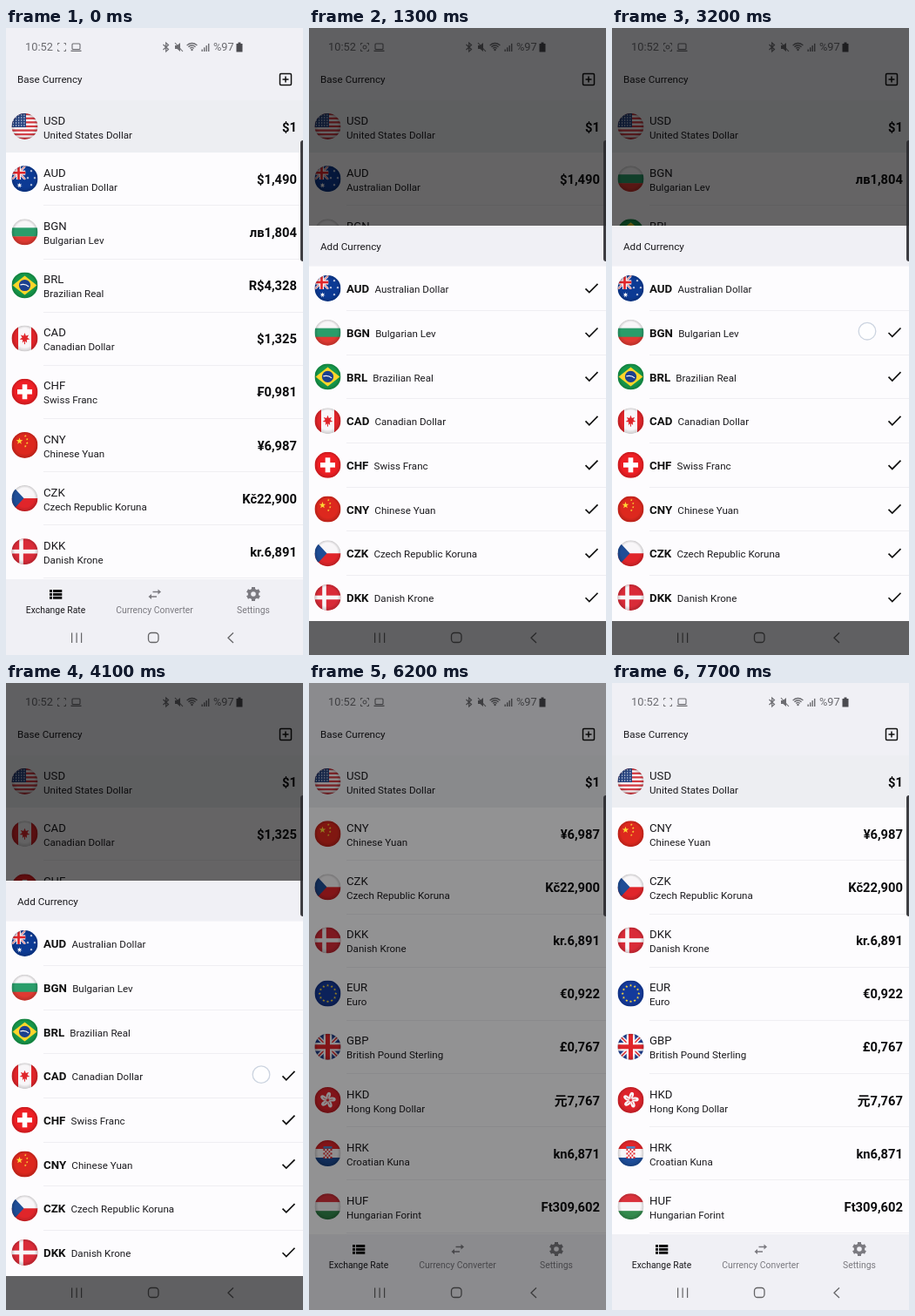
Write an HTML page with a canvas that moves like this. It is 341 px wide and 720 px high and loops after 8000 ms.

```html
<!DOCTYPE html>
<html lang="en">
<head>
<meta charset="utf-8">
<title>Exchange rates</title>
<style>
html, body { margin: 0; width: 100%; height: 100%; overflow: hidden; background: #f0f0f5; }
canvas { display: block; width: 341px; height: 720px; }
</style>
</head>
<body>
<canvas id="stage"></canvas>
<script>
const W = 341, H = 720, LOOP = 8000, STEP = 100;
const FONT = 'Roboto, "Noto Sans", "Noto Sans CJK SC", sans-serif';
const PANEL = '#f0f0f5', PAPER = '#fdfcfe', LINE = '#efeef2', INK = '#1c1b1f', GREY = '#7b7a80';
const STATUS = '#6c6c71', WHITE = '#f8f6f8', RED = '#e0252a';
const ROW = 61.14, SHEET_ROW = 50.71, SHEET_TOP = 227, NAV_TOP = 681;
const OPEN = 900, OPEN_MS = 400, DRAG = 5600, CLOSE = 6000, CLOSE_MS = 400, DIM = 0.6;
const TAU = 2 * Math.PI;

const dpr = window.devicePixelRatio || 1;
function setup(canvas) {
  canvas.width = W * dpr;
  canvas.height = H * dpr;
  const ctx = canvas.getContext('2d');
  ctx.scale(dpr, dpr);
  return ctx;
}
const screen = setup(document.getElementById('stage'));
const sheetCanvas = document.createElement('canvas');
const sheetCtx = setup(sheetCanvas);
let g = screen;

// ---------- drawing helpers ----------
const range = n => [...Array(n).keys()];
const polar = (x, y, r, a) => [x + r * Math.cos(a), y + r * Math.sin(a)];

function rect(color, x, y, w, h) {
  g.fillStyle = color;
  g.fillRect(x, y, w, h);
}
function disc(color, x, y, r) {
  g.fillStyle = color;
  g.beginPath();
  g.arc(x, y, r, 0, TAU);
  g.fill();
}
function arc(color, width, x, y, r, from = 0, to = TAU) {
  g.strokeStyle = color;
  g.lineWidth = width;
  g.beginPath();
  g.arc(x, y, r, from, to);
  g.stroke();
}
function trace(points) {
  g.beginPath();
  points.forEach(([x, y]) => g.lineTo(x, y));
}
function poly(color, points) {
  g.fillStyle = color;
  trace(points);
  g.fill();
}
function stroke(color, width, points) {
  g.strokeStyle = color;
  g.lineWidth = width;
  trace(points);
  g.stroke();
}
function box(color, width, x, y, w, h, r) {
  g.strokeStyle = color;
  g.lineWidth = width;
  g.beginPath();
  g.roundRect(x, y, w, h, r);
  g.stroke();
}
function text(str, x, y, size, color = INK, weight = 400, align = 'left') {
  g.font = `${weight} ${size}px ${FONT}`;
  g.textAlign = align;
  g.fillStyle = color;
  g.fillText(str, x, y);
  return g.measureText(str).width;
}
function star(color, x, y, r, n = 5, inner = 0.4) {
  poly(color, range(2 * n).map(i => polar(x, y, i % 2 ? r * inner : r, Math.PI * (i / n - 0.5))));
}

// ---------- flags, drawn around (0, 0) inside a 30 px circle ----------
const field = color => rect(color, -15, -15, 30, 30);

function bands(...colors) {
  const h = 30 / colors.length;
  colors.forEach((c, i) => rect(c, -15, -15 + i * h, 30, h + 0.3));
}
function cross(color, w, len = 30, x = 0) {
  rect(color, x - w / 2, -len / 2, w, len);
  rect(color, -len / 2, -w / 2, len, w);
}
function unionJack() {
  field('#1d3f94');
  for (const s of [1, -1]) {
    stroke(WHITE, 4.5, [[-15, -15 * s], [15, 15 * s]]);
    stroke(RED, 1.5, [[-15, -15 * s], [15, 15 * s]]);
  }
  cross(WHITE, 9.5);
  cross(RED, 5);
}

const flags = {
  USD() {
    bands(...range(13).map(i => i % 2 ? WHITE : '#d23a42'));
    rect('#27437f', -15, -15, 16.5, 16);
    range(25).forEach(i => disc('#e4e8f2', -13 + i % 5 * 3.1, -13 + Math.floor(i / 5) * 3, 0.7));
  },
  AUD() {
    field('#0c3a94');
    g.save();
    g.beginPath();
    g.rect(-15, -15, 16, 16);
    g.clip();
    g.translate(-7, -7);
    g.scale(0.53, 0.53);
    unionJack();
    g.restore();
    star(WHITE, -6, 7.5, 3.2, 7);
    range(4).forEach(i => star(WHITE, ...polar(7.5, -1, 4 + i % 2 * 4, i * TAU / 4), 1.6, 7));
  },
  BGN() { bands(WHITE, '#2a9d6a', '#e03a32'); },
  BRL() {
    field('#15974a');
    poly('#fcd62a', range(4).map(i => polar(0, 0, i % 2 ? 11 : 14, i * TAU / 4)));
    disc('#1b408f', 0, 0, 6.6);
    arc(WHITE, 1.2, -2, 9, 10, -1.9, -0.85);
  },
  CAD() {
    field(WHITE);
    rect(RED, -15, -15, 7.5, 30);
    rect(RED, 7.5, -15, 7.5, 30);
    star(RED, 0, -0.5, 6, 7, 0.5);
    rect(RED, -0.5, 0, 1, 6.5);
  },
  CHF() {
    field('#ee1f24');
    cross('#fff', 5.6, 17);
  },
  CNY() {
    field('#dd281e');
    star('#fdd835', -6, -4.5, 4);
    range(4).forEach(i => star('#fdd835', ...polar(-6, -4.5, 9, (i - 1.5) * 0.48), 1.5));
  },
  CZK() {
    bands(WHITE, RED);
    poly('#1f4d96', [[-15, -15], [-1, 0], [-15, 15]]);
  },
  DKK() {
    field('#d92b38');
    cross(WHITE, 4.6, 30, -4);
  },
  EUR() {
    field('#143a9c');
    range(12).forEach(i => star('#fbd83a', ...polar(0, 0, 9.3, i * TAU / 12), 1.7));
  },
  GBP: unionJack,
  HKD() {
    field('#de232b');
    for (const i of range(5)) {
      g.save();
      g.rotate(i * TAU / 5);
      g.fillStyle = WHITE;
      g.beginPath();
      g.ellipse(0.8, -5.2, 2.5, 4, 0.35, 0, TAU);
      g.fill();
      stroke(RED, 0.6, [[0, -2], [1, -6]]);
      g.restore();
    }
  },
  HRK() {
    bands(RED, WHITE, '#1c4c98');
    range(25).forEach(i => rect(i % 2 ? '#fff' : RED, -5 + i % 5 * 2, -5 + Math.floor(i / 5) * 2.2, 2, 2.2));
    rect('#4f86c2', -5, -8, 10, 2.6);
  },
  HUF() { bands('#da323c', WHITE, '#338b4d'); }
};

function flag(code, x, y) {
  g.save();
  g.translate(x, y);
  g.beginPath();
  g.arc(0, 0, 15, 0, TAU);
  g.clip();
  flags[code]();
  const shade = g.createRadialGradient(0, -1, 11, 0, 0, 15);
  shade.addColorStop(0, 'rgba(0,0,0,0)');
  shade.addColorStop(1, 'rgba(0,0,0,.18)');
  disc(shade, 0, 0, 15);
  g.restore();
}

// ---------- data and timing ----------
const currencies = `AUD|Australian Dollar|$1,490
BGN|Bulgarian Lev|лв1,804
BRL|Brazilian Real|R$4,328
CAD|Canadian Dollar|$1,325
CHF|Swiss Franc|₣0,981
CNY|Chinese Yuan|¥6,987
CZK|Czech Republic Koruna|Kč22,900
DKK|Danish Krone|kr.6,891
EUR|Euro|€0,922
GBP|British Pound Sterling|£0,767
HKD|Hong Kong Dollar|元7,767
HRK|Croatian Kuna|kn6,871
HUF|Hungarian Forint|Ft309,602`.split('\n').map(line => line.split('|'));

// Start of the tap on each of the first sheet rows
const taps = [2700, 3200, 3600, 4100, 4900];
const TAP_MS = 300, UNCHECK_MS = 200;
const checked = (i, t) => !(t >= taps[i] + UNCHECK_MS);

const progress = (t, start, ms) => Math.min(1, Math.max(0, (t - start) / ms));

function pose(t) {
  const open = progress(t, OPEN, OPEN_MS);
  const close = progress(t, CLOSE, CLOSE_MS);
  const drag = Math.max(0, (t - DRAG) / 200);
  return {
    dim: DIM * open ** 2 * Math.sqrt(1 - close),
    alpha: 1 - (1 - open) ** 1.25,
    drop: 260 * (1 - open) ** 2 + 125 * drag ** 2
  };
}

// ---------- parts of the screen ----------
function statusBar(t) {
  text('10:52', 22, 26.3, 12.8, STATUS);
  for (const i of range(4)) {
    const sx = i % 2 ? 1 : -1, sy = i < 2 ? 1 : -1;
    stroke(STATUS, 1, [[64 + sx * 2.5, 22 + sy * 4.5], [64 + sx * 4.5, 22 + sy * 4.5], [64 + sx * 4.5, 22 + sy * 2.5]]);
  }
  if ((t + 800) % 1000 < 500) box(STATUS, 1, 62, 20, 4, 4, 2);
  box(STATUS, 1.1, 76, 18, 9, 6.5, 1);
  stroke(STATUS, 1.3, [[74.5, 26.3], [86.5, 26.3]]);

  stroke(STATUS, 1.2, [[180.5, 19], [186.5, 24.6], [183.7, 27], [183.7, 17], [186.5, 19.4], [180.5, 25]]);
  poly(STATUS, [[194, 20], [196.5, 20], [200, 17], [200, 27], [196.5, 24], [194, 24]]);
  stroke(STATUS, 1.1, [[194, 17], [203, 27]]);
  range(3).forEach(i => arc(STATUS, 1.3, 213.5, 25.5, 3 + i * 2.5, -2.4, -0.75));
  disc(STATUS, 213.5, 25, 1.2);
  range(4).forEach(i => rect(STATUS, 224.5 + i * 2.5, 24.5 - i * 2.2, 1.4, 2.5 + i * 2.2));
  text('%97', 238, 26.3, 12.8, STATUS);
  rect('#4b4b50', 264.5, 18, 7, 9.5);
  rect('#4b4b50', 266.5, 16.5, 3, 2);
}

function addButton() {
  box('#111', 1.5, 314.5, 52.5, 13, 13, 1.2);
  stroke('#111', 1.5, [[317.5, 59], [324.5, 59]]);
  stroke('#111', 1.5, [[321, 55.5], [321, 62.5]]);
}

function listRow([code, name, rate], y) {
  flag(code, 21.5, y);
  text(code, 43, y - 2.3, 13.2);
  text(name, 43, y + 13.6, 11.6);
  text(rate, 334, y + 5.6, 14.75, '#0c0c0e', 700, 'right');
}

function swapArrow(x, y, dir) {
  stroke(GREY, 1.5, [[x - 5 * dir, y], [x + 2 * dir, y]]);
  poly(GREY, [[x + dir, y - 3], [x + 4.5 * dir, y], [x + dir, y + 3]]);
}

function gear(x, y) {
  g.save();
  g.translate(x, y);
  for (const i of range(6)) {
    g.rotate(TAU / 6);
    rect(GREY, -2, -8, 4, 4);
  }
  disc(GREY, 0, 0, 6.2);
  disc(PANEL, 0, 0, 2.8);
  g.restore();
}

function tabBar() {
  rect(PANEL, 0, 633, W, H - 633);
  for (const i of range(3)) {
    rect('#111', 50, 645 + i * 3.9, 3, 3);
    rect('#111', 54, 645 + i * 3.9, 10.3, 3);
  }
  swapArrow(173.5, 647.5, 1);
  swapArrow(168, 653, -1);
  gear(284, 650);
  text('Exchange Rate', 57, 672, 10.4, INK, 400, 'center');
  text('Currency Converter', 170.5, 672, 10.4, GREY, 400, 'center');
  text('Settings', 284, 672, 10.4, GREY, 400, 'center');
}

function systemKeys() {
  const c = 'rgba(0,0,0,.58)';
  range(3).forEach(i => rect(c, 75 + i * 5.5, 694.5, 1.2, 11.5));
  box(c, 1.3, 163.5, 694.5, 11.5, 11, 3.5);
  stroke(c, 1.3, [[261, 694.5], [255, 700.3], [261, 706]]);
}

function mainScreen(t) {
  rect(PANEL, 0, 0, W, 83);
  rect('#edeef2', 0, 83, W, 60);
  rect(PAPER, 0, 143, W, 490);
  statusBar(t);
  text('Base Currency', 13, 63.2, 11.65);
  addButton();
  listRow(['USD', 'United States Dollar', '$1'], 113);
  currencies.filter((c, i) => checked(i, t)).slice(0, 8).forEach((c, i) => {
    const y = 173.2 + i * ROW;
    listRow(c, y);
    rect(LINE, 43, Math.round(y + 30.2), W - 43, 1);
  });
  tabBar();
}

function sheetRow([code, name], y, isOn) {
  flag(code, 21.5, y);
  const w = text(code, 43, y + 5.2, 13.3, '#111', 700);
  text(name, 43 + w + 6.2, y + 5.2, 11.6);
  if (isOn) stroke('#111', 1.7, [[317.5, y + 0.3], [321.8, y + 4.6], [331.5, y - 5.2]]);
}

function sheet(t, { drop, alpha }) {
  g = sheetCtx;
  g.clearRect(0, 0, W, H);
  g.save();
  g.translate(0, SHEET_TOP + drop);
  rect(PAPER, 0, 0, W, NAV_TOP - SHEET_TOP);
  rect(PANEL, 0, 0, W, 46.5);
  text('Add Currency', 13, 28.3, 11.7);
  currencies.slice(0, 8).forEach((c, i) => {
    const y = 72 + i * SHEET_ROW;
    sheetRow(c, y, checked(i, t));
    if (i < 7) rect(LINE, 43, Math.round(y + 24.8), W - 43, 1);
  });
  g.restore();

  g = screen;
  g.save();
  // The opening window slides over the system bar; the dragged sheet does not.
  g.beginPath();
  g.rect(0, 0, W, t < DRAG ? H : NAV_TOP);
  g.clip();
  g.globalAlpha = alpha;
  g.drawImage(sheetCanvas, 0, 0, W, H);
  g.restore();
}

function touch(x, y) {
  disc('rgba(255,255,255,.6)', x, y, 9.8);
  arc('#ccd4e0', 1.3, x, y, 9.8);
}

function draw(t) {
  const p = pose(t);
  g = screen;
  mainScreen(t);
  rect(`rgba(0,0,0,${p.dim})`, 0, 0, W, H);
  if (t > OPEN && t < CLOSE) sheet(t, p);
  systemKeys();

  if (t >= OPEN && t < OPEN + TAP_MS) {
    disc('rgba(250,248,251,.28)', 321, 59, 16);
    addButton();
  }
  taps.forEach((start, i) => {
    if (t >= start && t < start + TAP_MS) touch(293, 297.5 + i * SHEET_ROW);
  });
  if (t >= DRAG && t < DRAG + TAP_MS) touch(244, 302 + p.drop);

  g.fillStyle = 'rgba(42,42,46,.9)';
  g.beginPath();
  g.roundRect(338, 129, 6, 139, 3);
  g.fill();
}

function tick(now) {
  draw(Math.floor(now % LOOP / STEP) * STEP);
  requestAnimationFrame(tick);
}
draw(0);
requestAnimationFrame(tick);
</script>
</body>
</html>
```
